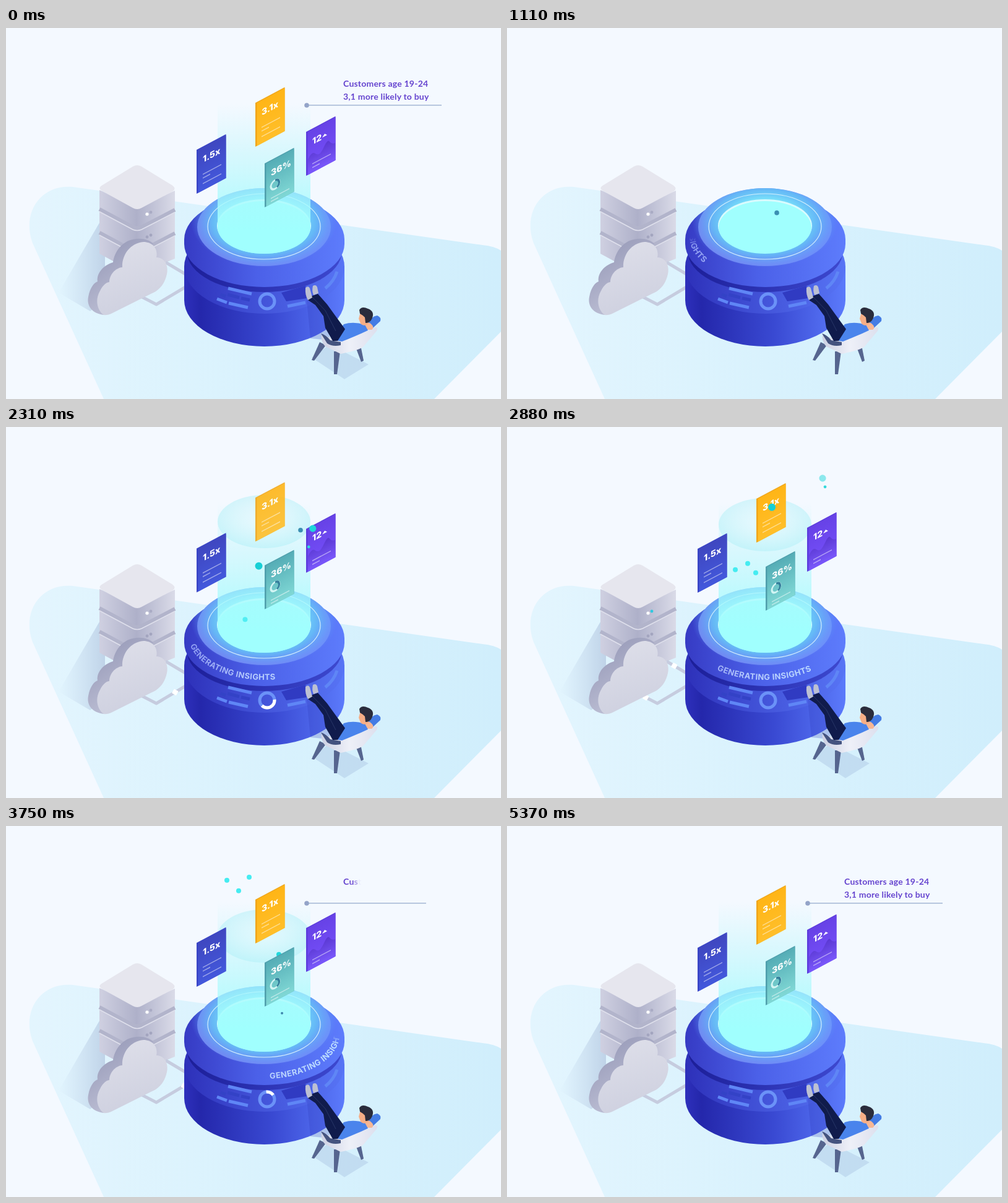
These frames come from a looping animation (800 by 600 pixels, 5.4 s). An HTML page:

```html
<!DOCTYPE html>
<html lang="en">
<head>
<meta charset="utf-8">
<title>Generating insights</title>
<style>
  html, body { margin: 0; width: 100%; height: 100%; overflow: hidden; background: #f4f9ff; }
  svg { display: block; width: 800px; height: 600px; }
  .card { animation: bob 5400ms ease-in-out infinite; }
  .card text { font: 800 14px Inter, sans-serif; fill: #fff; }
  .rim { font: 700 13px Inter, sans-serif; letter-spacing: .4px; }
  .note { font: 700 14px Lato, sans-serif; letter-spacing: .2px; fill: #6544cf; }
  @keyframes bob {
    0%, 0.55% { translate: 0 0; }
    0.56%, 33.33% { translate: 0 var(--a); }
    53.33% { translate: 0 var(--b); }
    69.44% { translate: 0 var(--c); }
    85.56% { translate: 0 var(--d); }
    99.44%, 100% { translate: 0 0; }
  }
</style>
</head>
<body>
<svg viewBox="0 0 800 600">
  <defs>
    <linearGradient id="floor"><stop stop-color="#e3f5fe"/><stop offset=".5" stop-color="#d9f2fd"/><stop offset="1" stop-color="#d0eefc"/></linearGradient>
    <linearGradient id="body"><stop stop-color="#2e30bc"/><stop offset=".1" stop-color="#2427ab"/><stop offset=".55" stop-color="#3949d2"/><stop offset="1" stop-color="#5b7afb"/></linearGradient>
    <linearGradient id="band"><stop stop-color="#2d30b9"/><stop offset=".4" stop-color="#3f4ed4"/><stop offset="1" stop-color="#5774f5"/></linearGradient>
    <linearGradient id="gap"><stop stop-color="#1c1e98"/><stop offset="1" stop-color="#3d49d0"/></linearGradient>
    <linearGradient id="dome"><stop stop-color="#363bc4"/><stop offset=".45" stop-color="#4b60e8"/><stop offset="1" stop-color="#5d7cfc"/></linearGradient>
    <linearGradient id="ring"><stop stop-color="#7386f0"/><stop offset="1" stop-color="#6f8efb"/></linearGradient>
    <radialGradient id="halo"><stop offset=".45" stop-color="#7de9fb"/><stop offset=".72" stop-color="#62c2f6" stop-opacity=".8"/><stop offset="1" stop-color="#5f9cf8" stop-opacity="0"/></radialGradient>
    <linearGradient id="beam" x2="0" y2="1"><stop stop-color="#b8f6fb" stop-opacity="0"/><stop offset=".3" stop-color="#b4f6fb" stop-opacity=".4"/><stop offset=".65" stop-color="#a6fbfd" stop-opacity=".75"/><stop offset=".85" stop-color="#a0fffe"/></linearGradient>
    <radialGradient id="lid"><stop stop-color="#e6fbfe" stop-opacity=".3"/><stop offset="1" stop-color="#a9eef6" stop-opacity=".45"/></radialGradient>
    <linearGradient id="sideL"><stop stop-color="#cfd0e1"/><stop offset="1" stop-color="#aeb0c9"/></linearGradient>
    <linearGradient id="sideR"><stop stop-color="#afb1ca"/><stop offset="1" stop-color="#dadbe8"/></linearGradient>
    <linearGradient id="cloudSide" x2=".6" y2="1"><stop stop-color="#8f92b2"/><stop offset="1" stop-color="#c3c5d9"/></linearGradient>
    <linearGradient id="cloud" x2=".3" y2="1"><stop stop-color="#dfe0ea"/><stop offset="1" stop-color="#cfd1e0"/></linearGradient>
    <linearGradient id="shade"><stop stop-color="#a8bede" stop-opacity="0"/><stop offset="1" stop-color="#9fb2d2" stop-opacity=".5"/></linearGradient>
    <linearGradient id="seat"><stop stop-color="#cdd1e3"/><stop offset=".5" stop-color="#eef0f8"/><stop offset="1" stop-color="#dde0ee"/></linearGradient>
    <linearGradient id="blue" x2="0" y2="1"><stop stop-color="#3f47c0"/><stop offset="1" stop-color="#4358dc"/></linearGradient>
    <linearGradient id="gold" x2="0" y2="1"><stop stop-color="#ffb516"/><stop offset="1" stop-color="#ffbf2a"/></linearGradient>
    <linearGradient id="violet" x2="0" y2="1"><stop stop-color="#6742e6"/><stop offset="1" stop-color="#7650fb"/></linearGradient>
    <linearGradient id="wave" x2="0" y2="1"><stop stop-color="#5a38d2"/><stop offset="1" stop-color="#7a58fb"/></linearGradient>
    <linearGradient id="teal" x2="0" y2="1"><stop stop-color="#55adb6"/><stop offset="1" stop-color="#80d8d5"/></linearGradient>
    <linearGradient id="rimInk" gradientUnits="userSpaceOnUse" x1="292" x2="542" y1="0" y2="0"><stop stop-color="#8a98f1"/><stop offset=".4" stop-color="#b6cbfd"/><stop offset="1" stop-color="#bfe2ff"/></linearGradient>
    <linearGradient id="rimFade" gradientUnits="userSpaceOnUse" x1="0" x2="0" y1="339" y2="352"><stop stop-color="#000"/><stop offset="1" stop-color="#fff"/></linearGradient>
    <mask id="rimMask" maskUnits="userSpaceOnUse" x="270" y="300" width="300" height="130"><rect x="270" y="300" width="300" height="130" fill="url(#rimFade)"/></mask>
    <path id="domeShape" d="M288 342A129.5 72 0 0 1 547 342V349A129.5 70 0 0 1 288 349Z"/>
    <ellipse id="ringShape" cx="417" cy="322" rx="108" ry="63"/>
    <clipPath id="domeClip"><use href="#domeShape"/><use href="#ringShape"/></clipPath>
    <path id="rimPath" d="M295 338A122 71 0 0 0 539 338"/>
  </defs>

  <rect width="800" height="600" fill="#f4f9ff"/>
  <path d="M158 600L43 348C25 300 55 252 108 257L770 351Q790 353 800 360V491L692 600Z" fill="url(#floor)"/>
  <path data-in="1200 1800" d="M151 315L85 428L136 458L160 440V362Z" fill="url(#shade)"/>

  <!-- server -->
  <g>
    <path d="M151 262V365L212 398V290Z" fill="url(#sideL)"/>
    <path d="M273 263V373L212 398V290Z" fill="url(#sideR)"/>
    <g fill="none" stroke="#b2b4cb" stroke-width="6" stroke-linejoin="round">
      <path d="M151 293L205 322Q212 325 219 322L273 294"/>
      <path d="M151 331L205 360Q212 363 219 360L273 332"/>
    </g>
    <g fill="none" stroke="#dfe0ec" stroke-width="1.5">
      <path d="M151 297L205 326Q212 329 219 326L273 298"/>
      <path d="M151 335L205 364Q212 367 219 364L273 336"/>
    </g>
    <path d="M205 224Q212 220 219 224L268 254Q277 260 268 265L219 291Q212 295 205 291L156 264Q147 259 156 254Z" fill="#e6e6ee"/>
    <circle cx="228" cy="301" r="2.6" fill="#fff"/><circle id="led" cx="234" cy="298" r="2.4"/>
    <circle cx="228" cy="338" r="2.4" fill="#a3a5bf"/><circle cx="234" cy="335" r="2.4" fill="#a3a5bf"/>
  </g>

  <!-- cables -->
  <g fill="none" stroke="#c6ccdf" stroke-width="5" stroke-linejoin="round">
    <path class="cable" d="M258 379L290 398"/>
    <path class="cable" d="M212 431L243 447L290 419"/>
  </g>
  <rect class="packet" x="-4" y="-4" width="8" height="8" rx="1" fill="#fff"/>
  <rect class="packet" x="-4" y="-4" width="8" height="8" rx="1" fill="#fff"/>

  <!-- cloud -->
  <path d="M158 464C140 462 130 450 133 435C136 418 144 411 148 410C146 398 156 384 173 379C175 362 188 345 205 342C218 339 232 342 238 349L200 420Z" fill="url(#cloudSide)"/>
  <path d="M158 464C148 458 143 440 152 425C157 415 163 411 167 411C167 400 176 388 188 387C187 368 200 348 222 346C238 346 246 358 243 371C256 371 263 384 260 398C256 416 246 425 236 429L172 461Q164 465 158 464Z" fill="url(#cloud)"/>

  <!-- machine -->
  <path d="M288 386V440A129.5 75 0 0 0 547 440V386Z" fill="url(#body)"/>
  <ellipse cx="417.5" cy="386" rx="129.5" ry="76" fill="url(#band)"/>
  <ellipse cx="417.5" cy="362" rx="125" ry="65" fill="url(#gap)"/>
  <g stroke="#5f86f6" stroke-width="5" fill="none">
    <path d="M359 421L397 430M341 438L357 444M360 445L391 452M455 450L484 444M516 421Q530 410 535 394"/>
    <path d="M358 431L377 436M380 437L394 440M347 431L355 434" stroke="#3342c6"/>
  </g>
  <path d="M445 428L484 417L487 437L453 442Z" fill="#303bc2"/>
  <circle cx="422" cy="442" r="12" fill="none" stroke="#6b92f8" stroke-width="5"/>
  <circle id="spin" cx="422" cy="442" r="12" fill="none" stroke="#fff" stroke-width="5" pathLength="1" transform="rotate(-90 422 442)"/>
  <path data-in="1200 1800" d="M486 440L500 432L525 505L492 502Z" fill="#2c39b8" data-max=".25"/>
  <use href="#domeShape" fill="url(#dome)"/>
  <use href="#ringShape" fill="url(#ring)"/>
  <ellipse cx="417" cy="322" rx="75" ry="43" fill="#4d63e2"/>
  <g data-in="150 900">
    <ellipse cx="417" cy="313" rx="118" ry="74" fill="url(#halo)" clip-path="url(#domeClip)"/>
    <ellipse cx="417" cy="320" rx="76" ry="43" fill="#d9fbfe"/>
    <ellipse cx="417" cy="322.5" rx="75" ry="42.5" fill="#a0fffe"/>
  </g>
  <ellipse cx="417" cy="321" rx="91" ry="53" fill="none" stroke="#d5effd" stroke-width="1.2"/>
  <g mask="url(#rimMask)"><text class="rim" fill="url(#rimInk)"><textPath id="rimText" href="#rimPath">GENERATING INSIGHTS</textPath></text></g>

  <!-- beam -->
  <path data-in="1180 1700" d="M342 122H492V322A75 43 0 0 1 342 322Z" fill="url(#beam)"/>
  <ellipse id="top" cx="417" rx="75" ry="43" fill="url(#lid)"/>
  <g id="backDots"></g>
  <g id="cards"></g>
  <g id="frontDots"></g>

  <!-- chair and sitter -->
  <path data-in="1200 1800" d="M494 533L523 512L586 544L547 568Z" fill="#b9d3ec" data-max=".65"/>
  <g fill="#56658f">
    <path d="M507 508L517 513L498 538L494 537Z"/><path d="M530 523H540L535 560H530Z"/><path d="M565 516L573 513L578 538L574 540Z"/>
  </g>
  <path d="M510 497L543 506L596 484Q602 483 599 490L577 516Q570 521 541 527L516 515Q508 506 510 497Z" fill="url(#seat)"/>
  <path d="M509 494Q518 497 524 505L541 508V513Q528 516 519 510Z" fill="#44537f"/>
  <path d="M585 479Q590 466 600 465Q607 468 605 474L592 486Z" fill="#447ce4"/>
  <path d="M576 478L588 477Q597 484 591 488L582 488Z" fill="#f6b795"/>
  <path d="M529 500L546 479Q562 474 580 480L585 489Q566 498 543 507L531 505Z" fill="#4a84ec"/>
  <path d="M488 440L495 433L504 430L519 447L532 465L548 487L536 506L528 506L516 485L513 466L500 448Z" fill="#101b4c"/>
  <path d="M495 435L516 457L533 490" fill="none" stroke="#293768"/>
  <path d="M484 420Q489 416 491 421L495 436L488 440Q483 432 484 420ZM496 417Q501 414 503 419L505 429L497 432Q494 425 496 417Z" fill="#bcc0d3"/>
  <path d="M573 459L584 460L586 478Q578 484 573 478L570 470Z" fill="#f6ae86"/>
  <path d="M571 456Q575 449 585 454Q596 458 592 469Q588 478 581 477L580 468Q576 464 572 462Z" fill="#2a2c3c"/>

  <!-- callout -->
  <g id="call">
    <circle cx="486" cy="125" r="3.8" fill="#93a3c8"/>
    <path id="rule" stroke="#93a9cc" stroke-width="1.3"/>
  </g>
  <text class="note" x="545" y="95">Customers age 19-24</text>
  <text class="note" x="545" y="116">3,1 more likely to buy</text>
</svg>
<script>
const LOOP = 5400, NS = 'http://www.w3.org/2000/svg';
const $ = id => document.getElementById(id);
const all = q => [...document.querySelectorAll(q)];
const clamp = v => Math.max(0, Math.min(1, v));
const ramp = (t, a, b) => clamp((t - a) / (b - a));

function along(points, t) {
  if (t <= points[0][0]) return points[0][1];
  for (let i = 1; i < points.length; i++) {
    const [a, v] = points[i - 1], [b, w] = points[i];
    if (t < b) return v + (w - v) * (t - a) / (b - a);
  }
  return points.at(-1)[1];
}

// Cards
const bars = (...rows) => rows.map(([y, w]) =>
  `<path d="M10 ${y}h${w}" stroke="#fff" stroke-opacity=".5" stroke-width="1.6"/>`).join('');
const label = s => `<text x="10" y="26">${s}</text>`;
const cards = [
  { x: 308, y: 197, face: 'blue', edge: '#3a45c6', bob: [-1, 0, -8, -1], show: '1560 2000',
    art: label('1.5x') + bars([45, 30], [51, 12], [60, 30]) },
  { x: 403, y: 121, face: 'gold', edge: '#f0a51a', bob: [-8, -5, -2, -7], show: '1950 2350',
    art: label('3.1x') + bars([45, 30], [51, 12], [60, 30]) },
  { x: 485, y: 168, face: 'violet', edge: '#5c3cdc', bob: [-2, -5, -3, 3], show: '1850 2250',
    art: '<path d="M3 46Q9 36 14 42T22 47T30 38T38 36T47 43V71H3Z" fill="url(#wave)"/>' +
      label('12') + '<path d="M26 23l4-4 4 4z" fill="#fff"/>' + bars([57, 30], [63, 12]) },
  { x: 418, y: 219, face: 'teal', edge: '#4f9fac', bob: [3, 7, 2, 5.5], show: '1450 1850',
    art: label('36%') + '<g fill="none" stroke-width="3"><circle cx="17" cy="43" r="7" stroke="#d2f5f4"/>' +
      '<path d="M17 36a7 7 0 0 1 3 13" stroke="#347f9c"/></g>' + bars([62, 30], [67, 12]) }
];
$('cards').innerHTML = cards.map(c =>
  `<g data-in="${c.show}"><g class="card" style="${c.bob.map((v, i) => `--${'abcd'[i]}:${v}px`).join(';')}">
    <g transform="matrix(1 -.53 0 1 ${c.x} ${c.y})">
      <rect width="47.5" height="71" fill="${c.edge}"/>
      <rect x="2.5" y="1.5" width="45" height="69.5" fill="url(#${c.face})"/>${c.art}
    </g></g></g>`).join('');

// Dots: start x, y, time; later x, y, time; radius, colour, behind the cards
const SURFACE = 322;
const dots = [
  [436, 299, 1110, 459, 223, 1800, 3.8, '#3b8fb2'],
  [391, 310, 1800, 428, 130, 2880, 6, '#17cfd5'],
  [483, 237, 1800, 510, 83, 2880, 5.6, '#1fd6da'],
  [467, 281, 1800, 514, 97, 2880, 2.4, '#33d9dc'],
  [369, 231, 2880, 357, 88, 3750, 4, '#45ecf1'],
  [389, 221, 2880, 393, 83, 3750, 4, '#45ecf1'],
  [402, 236, 2880, 376, 105, 3750, 4, '#45ecf1'],
  [441, 208, 3750, 416, 63, 4620, 4, '#1fd9dc', true],
  [446, 303, 3750, 481, 164, 4620, 2, '#3f86ad']
].map(([x, y, t, x2, y2, t2, r, fill, back]) => {
  const el = document.createElementNS(NS, 'circle');
  el.setAttribute('r', r);
  el.setAttribute('fill', fill);
  $(back ? 'backDots' : 'frontDots').append(el);
  const vx = (x2 - x) / (t2 - t), vy = (y2 - y) / (t2 - t);
  const born = t + (SURFACE - y) / vy;
  return { el, born, x: x + vx * (born - t), vx, vy };
});

// Callout letters
const letters = all('.note').flatMap(line => {
  const spans = [...line.textContent].map(ch => {
    const s = document.createElementNS(NS, 'tspan');
    s.textContent = ch;
    return s;
  });
  line.replaceChildren(...spans);
  return spans;
});

const fades = all('[data-in]').map(el => {
  const [a, b] = el.dataset.in.split(' ').map(Number);
  return { el, a, b, max: +(el.dataset.max || 1) };
});
const cables = all('.cable'), packets = all('.packet');
const launches = [1480, 2720, 4050], trips = [420, 1060];
const head = [[1150, 0], [1800, .98], [2000, 1], [2400, 1.8], [2880, 2], [3400, 2.85], [3750, 3.15], [4620, 4.03], [5150, 5]];
const tail = [[1150, 0], [1500, 0], [1800, .5], [2000, 1], [2400, 1.3], [2880, 2], [3400, 2.3], [3750, 2.98], [4620, 3.87], [5150, 5]];
const lidY = [[1170, 322], [1800, 173], [2300, 153], [2880, 158], [3750, 178], [4620, 247], [5340, 322]];

function render(time) {
  const t = time < 30 ? LOOP - 1 : time;   // the loop opens on its closing picture
  for (const f of fades) f.el.style.opacity = f.max * ramp(t, f.a, f.b);

  $('rimText').setAttribute('startOffset', 74 + .1028 * (t - 2880));
  $('led').setAttribute('fill', t > 2700 && t < 3100 ? '#2fc8e0' : '#a9abc4');

  $('top').setAttribute('cy', along(lidY, t));
  $('top').style.opacity = ramp(t, 1170, 1350) * (1 - ramp(t, 4500, 5320));

  const from = along(tail, t), len = Math.min(.999, along(head, t) - from);
  $('spin').style.display = len > .002 ? '' : 'none';
  $('spin').setAttribute('stroke-dasharray', `${len} ${1 - len}`);
  $('spin').setAttribute('stroke-dashoffset', -(from % 1));

  packets.forEach((el, i) => {
    const p = launches.map(l => (t - l) / trips[i]).find(v => v > 0 && v < 1);
    el.style.display = p ? '' : 'none';
    if (!p) return;
    const { x, y } = cables[i].getPointAtLength(p * cables[i].getTotalLength());
    el.setAttribute('transform', `translate(${x} ${y}) rotate(30)`);
  });

  for (const d of dots) {
    const age = t - d.born;
    d.el.setAttribute('cx', d.x + d.vx * age);
    d.el.setAttribute('cy', SURFACE + d.vy * age);
    d.el.style.opacity = ramp(age, 15, 75) * (1 - ramp(age, 1550, 1800)) * (1 - ramp(t, 5220, 5350));
  }

  $('call').style.opacity = ramp(t, 3450, 3540);
  const p = ramp(t, 3480, 3890);
  $('rule').setAttribute('d', `M486 124.8h${218 * (1 - (1 - p) ** 2)}`);
  letters.forEach((s, i) => {
    const start = 3682 + 22 * i;
    s.setAttribute('fill-opacity', ramp(t, start, start + 50));
  });
}

const start = performance.now();
document.getAnimations().forEach(a => { a.startTime = start; });
(function tick() {
  render((performance.now() - start) % LOOP);
  requestAnimationFrame(tick);
})();
</script>
</body>
</html>
```
